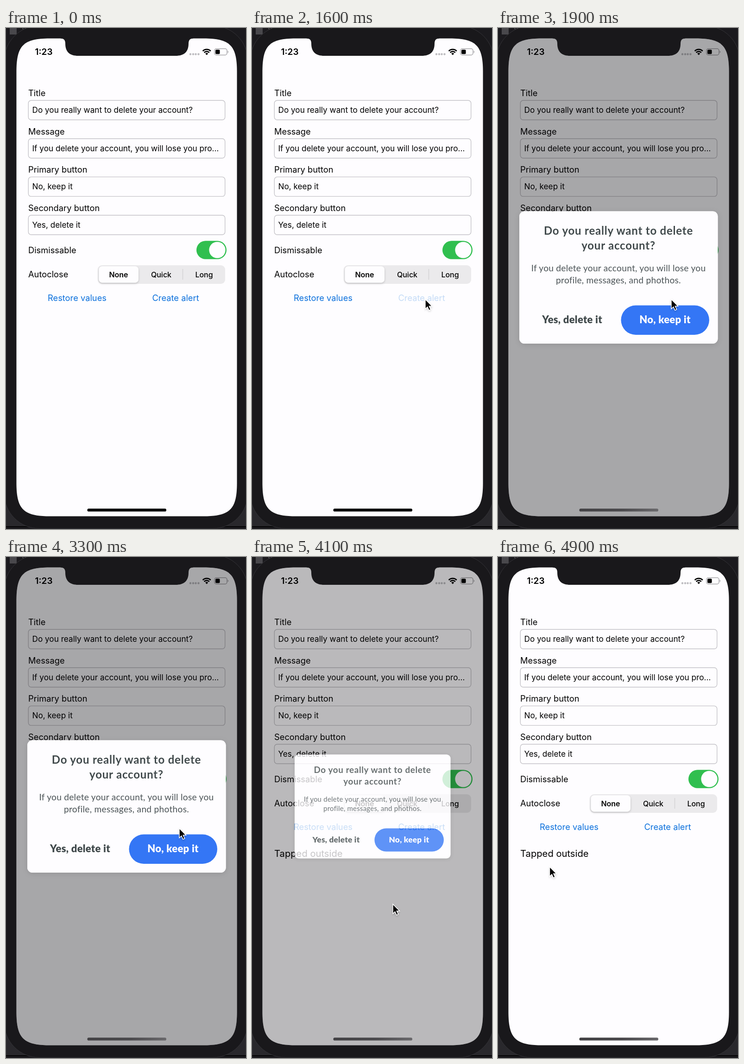
An HTML page for the animation above (5000 ms loop, 518 by 1081 pixels).

```html
<!DOCTYPE html>
<html lang="en">
<head>
<meta charset="utf-8">
<title>Alert demo</title>
<style>
  html, body { margin: 0; width: 100%; height: 100%; overflow: hidden; background: #1b1a1e; }
  svg { display: block; width: 518px; height: 1081px; }
  text { font-family: Inter, sans-serif; font-size: 18.3px; }
  .field { fill: none; stroke: #c5c4c9; stroke-width: 1.4; }
  .value { font-size: 17.2px; }
  .segment text { font-size: 16px; font-weight: 500; text-anchor: middle; }
  .link { fill: #0b70dc; }
  #alert text { font-family: Lato, sans-serif; text-anchor: middle; fill: #40494b; }
  #alert .title { font-size: 24px; font-weight: 700; letter-spacing: .8px; }
  #alert .body { font-size: 19.2px; letter-spacing: .25px; fill: #4c5457; }
  #alert .button { font-size: 22px; font-weight: 900; letter-spacing: .3px; }
</style>
</head>
<body>
<svg viewBox="0 0 518 1081">
  <defs>
    <clipPath id="screen">
      <path d="M22.500 94.500C22.500 37.500 37.500 22.500 94.500 22.500H426.500C483.500 22.500 498.500 37.500 498.500 94.500V981.500C498.500 1038.500 483.500 1053.500 426.500 1053.500H94.500C37.500 1053.500 22.500 1038.500 22.500 981.500z"/>
    </clipPath>
    <linearGradient id="barFade" x2="1" y2=".03">
      <stop stop-color="#434245"/><stop offset=".55" stop-color="#4b4a4d"/><stop offset="1" stop-color="#69686b"/>
    </linearGradient>
    <filter id="soft" x="-20%" y="-20%" width="140%" height="150%">
      <feDropShadow dx="0" dy="2" stdDeviation="2" flood-opacity=".2"/>
    </filter>
    <filter id="cardShadow" x="-10%" y="-10%" width="120%" height="125%">
      <feDropShadow dx="0" dy="2" stdDeviation="6" flood-opacity=".12"/>
    </filter>
    <rect id="card" x="46" y="395.500" width="428.500" height="285.500" rx="11"/>
    <mask id="aroundCard" maskUnits="userSpaceOnUse" x="0" y="0" width="518" height="1081">
      <rect width="518" height="1081" fill="#fff"/>
      <use id="hole" href="#card"/>
    </mask>
  </defs>

  <!-- window behind the device -->
  <rect width="518" height="1081" fill="#1b1a1e"/>
  <rect y="1020" width="518" height="55" fill="#29282c"/>
  <rect y="1075" width="518" height="2" fill="#050506"/>
  <rect x="8" y="-1" width="15" height="15" fill="#49484c"/>
  <text x="33" y="8" fill="#58575b" style="font-size:17px">Vi</text>
  <rect x="-4" y="-5" width="526" height="1085" rx="76" fill="#19181b" stroke="#353438"/>

  <g clip-path="url(#screen)">
    <rect x="22" y="22" width="478" height="1033" fill="#fefdff"/>

    <!-- status bar -->
    <text x="62.5" y="58" style="font-size:19px;font-weight:600">1:23</text>
    <g fill="#bdbcc0">
      <circle cx="398" cy="56.5" r="2.2"/><circle cx="404" cy="56.5" r="2.2"/>
      <circle cx="409.500" cy="56.5" r="2.2"/><circle cx="415.500" cy="56.5" r="2.2"/>
    </g>
    <g fill="none" stroke="#000" stroke-width="2.7">
      <path d="M424.700 49.700a12 12 0 0 1 17 0M427.700 53a7.700 7.700 0 0 1 11 0"/>
      <path d="M433.200 58.500l-3-3.200a4.300 4.300 0 0 1 6 0z" fill="#000" stroke="none"/>
    </g>
    <rect x="450" y="44.700" width="27" height="13.600" rx="4" fill="none" stroke="#98979b" stroke-width="1.300"/>
    <rect x="452" y="46.700" width="9.500" height="9.600" rx="2"/>
    <path d="M478.700 49.200q3 2.300 0 4.600z" fill="#98979b"/>

    <g id="form"></g>

    <text x="48" y="485.500">Dismissable</text>
    <rect x="411" y="459.300" width="65" height="39.500" rx="19.750" fill="#30bf4f"/>
    <circle cx="456" cy="479" r="17.600" fill="#fefdff"/>

    <text x="48" y="538">Autoclose</text>
    <g class="segment">
      <rect x="198" y="512" width="275" height="40" rx="9" fill="#ebeaec"/>
      <rect x="200.500" y="514" width="85.500" height="35.500" rx="7.500" fill="#fefdff" filter="url(#soft)"/>
      <path d="M381.500 520v23" stroke="#d0cfd3" stroke-width="1.300"/>
      <text x="243" y="538" style="font-weight:600">None</text>
      <text x="335" y="538">Quick</text>
      <text x="427.500" y="538">Long</text>
    </g>

    <text class="link" x="90" y="589">Restore values</text>
    <text class="link" id="create" x="315.500" y="589">Create alert</text>
    <text id="result" x="48" y="647" style="font-size:20.200px">Tapped outside</text>

    <g mask="url(#aroundCard)">
      <rect id="dim" x="22" y="22" width="478" height="1033" fill="#020003"/>
    </g>
    <rect id="homeBar" x="175.500" y="1037" width="170.500" height="6.300" rx="3.150"/>

    <g id="alert">
      <use href="#card" fill="#fefdff" filter="url(#cardShadow)"/>
      <text class="title" x="260" y="446">Do you really want to delete</text>
      <text class="title" x="260" y="478">your account?</text>
      <text class="body" x="260" y="525">If you delete your account, you will lose you</text>
      <text class="body" x="260" y="551">profile, messages, and phothos.</text>
      <text class="button" x="160" y="637">Yes, delete it</text>
      <rect x="265.500" y="598.500" width="190.500" height="63.500" rx="31.750" fill="#3476f5"/>
      <text class="button" x="360.500" y="637" style="fill:#fefdff">No, keep it</text>
    </g>
  </g>

  <path d="M118 21v1.500q10 0 10 11C128 52 138 60 156 60H366C384 60 394 52 394 33.500q0-11 10-11V21z" fill="#19181b"/>

  <path id="cursor" d="M0 0V20.500L4.700 16.200L8 23.600L11.600 22L8.300 14.800H14.600Z"
        stroke="#fff" stroke-width="1.400" filter="url(#soft)"/>
</svg>

<script>
const LOOP = 5000, STEP = 100, FADE = 305;
const $ = id => document.getElementById(id);

const fields = [
  ['Title', 'Do you really want to delete your account?'],
  ['Message', 'If you delete your account, you will lose you pro…'],
  ['Primary button', 'No, keep it'],
  ['Secondary button', 'Yes, delete it']
];
$('form').innerHTML = fields.map(([label, value], i) => `
  <g transform="translate(48 ${i * 82.6})">
    <text y="147">${label}</text>
    <rect class="field" x=".3" y="156.2" width="424.400" height="42" rx="6"/>
    <text class="value" x="8.500" y="183">${value}</text>
  </g>`).join('');

// Pointer path: time, x, y
const path = [
  [200, 470, 535], [400, 442, 560], [600, 398, 573], [800, 374, 585.5],
  [3300, 374, 585.5], [3500, 352, 627], [3800, 304, 749],
  [4700, 304, 749], [4900, 111.5, 668.5], [5000, 111.5, 668.5]
];

const progress = (t, from, to) => Math.min(1, Math.max(0, (t - from) / (to - from)));
const ease = p => p < .5 ? 2 * p * p : 1 - 2 * (1 - p) ** 2;
const fade = (t, from) => ease(progress(t, from, from + FADE));

function pointerAt(t) {
  const i = Math.max(1, path.findIndex(p => p[0] >= t));
  const [a, b] = [path[i - 1], path[i]];
  const p = progress(t, a[0], b[0]);
  return [1, 2].map(k => a[k] + (b[k] - a[k]) * p);
}

function draw(t) {
  const shown = fade(t, 1600) - fade(t, 4000);
  const scale = `translate(260.250 538.250) scale(${shown}) translate(-260.250 -538.250)`;
  $('dim').setAttribute('opacity', .34 * shown);
  $('alert').setAttribute('opacity', shown);
  $('alert').setAttribute('transform', scale);
  $('hole').setAttribute('transform', scale);
  $('homeBar').setAttribute('fill', t < 1700 ? '#000' : 'url(#barFade)');
  $('create').setAttribute('opacity', t < 1500 ? 1 : .23 + .77 * progress(t, 1600, 1900));
  $('result').setAttribute('visibility', t < 4100 ? 'hidden' : 'visible');
  $('cursor').setAttribute('visibility', t < 200 ? 'hidden' : 'visible');
  $('cursor').setAttribute('transform', `translate(${pointerAt(t)})`);
}

function tick() {
  draw(Math.floor(performance.now() % LOOP / STEP) * STEP);
  requestAnimationFrame(tick);
}
tick();
</script>
</body>
</html>
```
